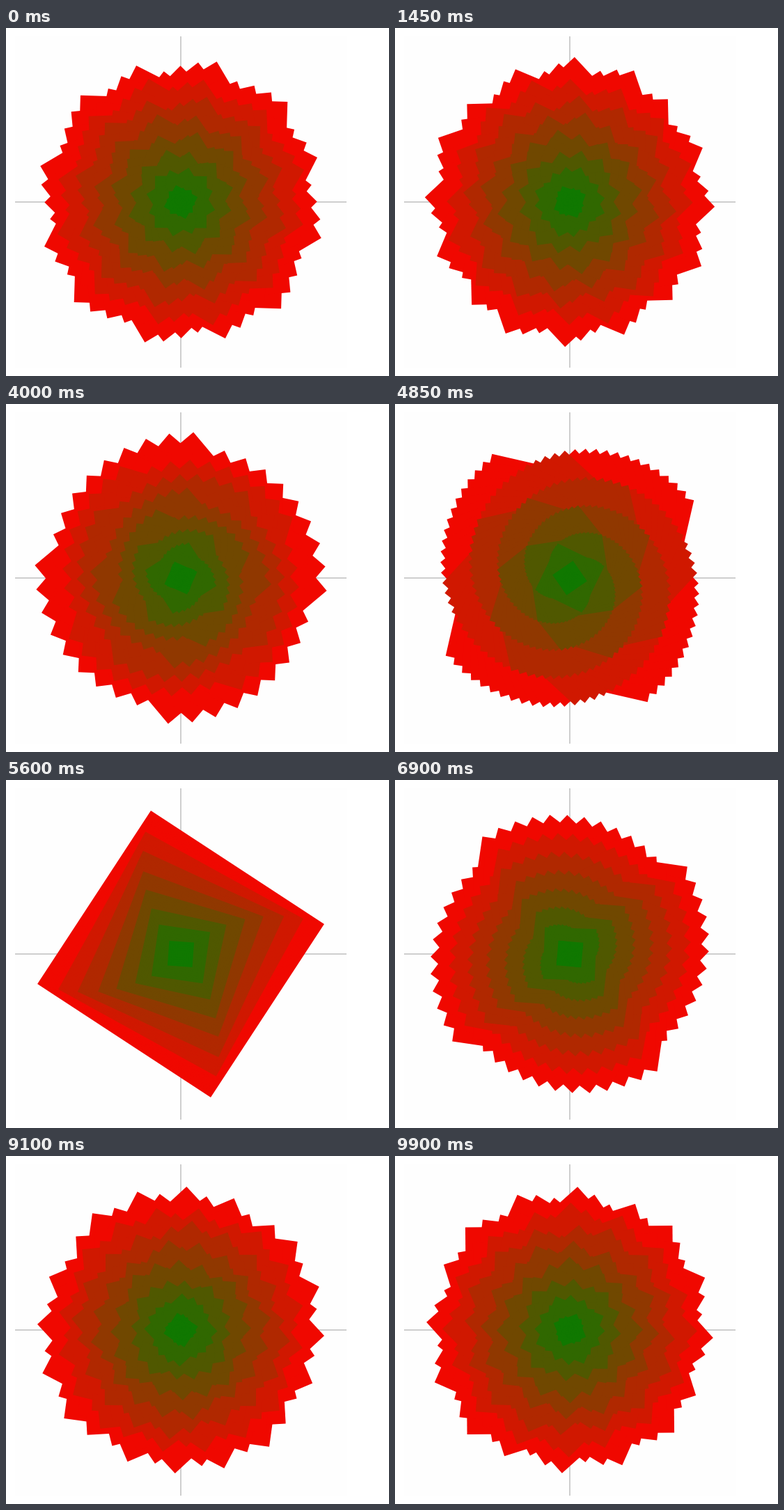
These frames come from a looping animation (550 by 500 pixels, 9.95 s). An HTML page with a canvas:

```html
<!DOCTYPE html>
<html lang="en">
<head>
<meta charset="utf-8">
<title>Twisted squares</title>
<style>
  html, body { margin: 0; width: 100%; height: 100%; overflow: hidden; background: #fff; }
  canvas { display: block; }
</style>
</head>
<body>
<canvas id="stage" width="550" height="500"></canvas>
<script>
const ctx = document.getElementById('stage').getContext('2d');

const STEP_MS = 50;
const STEPS = 199;
const SQUARES = 100;
const BANDS = 8;
const CENTER = { x: 251, y: 250 };
const AXIS = 238;
const UNIT = AXIS / 160;

// Colour runs from green in the middle to red at the rim, in even bands.
function bandColor(i) {
  const band = Math.ceil(i * BANDS / SQUARES) - 1;
  return `rgb(${16 + 32 * band}, ${120 - 16 * band}, 0)`;
}

function drawBackground() {
  ctx.fillStyle = '#fff';
  ctx.fillRect(0, 0, 550, 500);
  ctx.fillStyle = '#fefefe';
  ctx.fillRect(CENTER.x - AXIS, CENTER.y - AXIS, 2 * AXIS, 2 * AXIS);
  ctx.fillStyle = '#a0a0a0';
  ctx.fillRect(CENTER.x - AXIS, CENTER.y - 0.5, 2 * AXIS, 1);
  ctx.fillRect(CENTER.x - 0.5, CENTER.y - AXIS, 1, 2 * AXIS);
}

function drawSquare(i, angle) {
  const half = i * UNIT;
  ctx.save();
  ctx.translate(CENTER.x, CENTER.y);
  ctx.rotate(angle);
  ctx.fillStyle = bandColor(i);
  ctx.fillRect(-half, -half, 2 * half, 2 * half);
  ctx.restore();
}

function draw(now) {
  const step = Math.floor(now / STEP_MS) % STEPS;
  const twist = -(1.005 + 0.005 * step);
  drawBackground();
  for (let i = SQUARES; i > 0; i--) drawSquare(i, i * twist);
}

let start = null;
function tick(now) {
  if (start === null) start = now;
  draw(now - start);
  requestAnimationFrame(tick);
}

draw(0);
requestAnimationFrame(tick);
</script>
</body>
</html>
```
